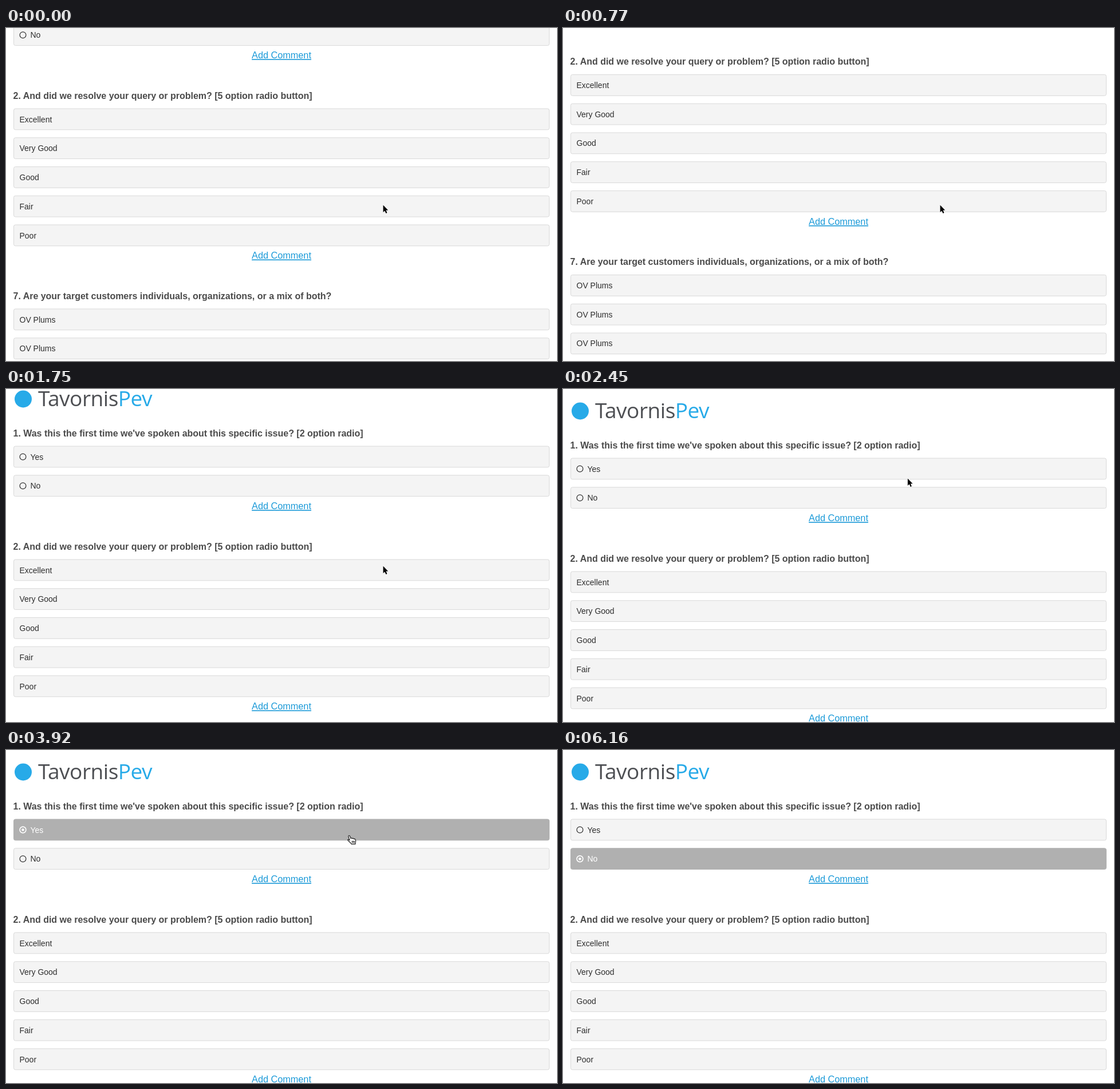
An HTML page for the animation above (6230 ms loop, 962x582 px).

```html
<!DOCTYPE html>
<html lang="en">
<head>
<meta charset="utf-8">
<title>Survey</title>
<style>
html, body { margin: 0; width: 100%; height: 100%; overflow: hidden; background: #fff; }
svg { display: block; width: 962px; height: 582px; font-family: "Liberation Sans", Arial, sans-serif; }
.heading { font-size: 15.97px; font-weight: bold; fill: #4b4b4b; }
.label { font-size: 14px; }
.link { font-size: 16.25px; fill: #1b9ad8; text-decoration: underline 1px; text-anchor: middle; }
.brand { font-family: "Open Sans", sans-serif; font-size: 37px; letter-spacing: -.5px; fill: #4d4f53; }
.brand tspan { fill: #27aae8; }
</style>
</head>
<body>
<svg viewBox="0 0 962 582">
  <g id="page">
    <circle cx="30" cy="38.5" r="15" fill="#27aae8"/>
    <text class="brand" x="56" y="51">Tavornis<tspan>Pev</tspan></text>
  </g>
  <path id="arrow" d="M.5 .5V13L3.3 10.4L5.4 15L7.4 14.1L5.5 9.6H9.2Z" stroke="#fff" paint-order="stroke"/>
  <path id="hand" fill="#fff" stroke="#111" stroke-width="1.1" stroke-linejoin="round"
    d="M4.2 9.6L1.9 2.8Q2.5 0 4.7 2.5L6.1 6.4Q7.5 4.4 8.9 6.8Q10.3 5 11.6 7.5Q14 6.2 14.6 10Q15.1 12.4 14.1 14.2V16.2H7.2Q6.4 14.4 3.2 11.8L.9 9.5Q.6 6.8 4.2 9.6ZM8.5 10.5V14M10.5 10.5V14M12.4 10.5V14"/>
</svg>
<script>
const LOOP = 6230, TICK = 70, ROW_STEP = 50.75;
const PICK_YES = 3290, PICK_NO = 4830, CURSOR_GONE = 5460;
const INK = 46, IDLE = 244, PICKED = 176, EDGE = 217;
const page = document.getElementById('page');
const arrow = document.getElementById('arrow');
const hand = document.getElementById('hand');

function add(tag, attrs, text) {
  const node = document.createElementNS(page.namespaceURI, tag);
  for (const key in attrs) node.setAttribute(key, attrs[key]);
  if (text) node.textContent = text;
  return page.appendChild(node);
}

function addRow(y, text, hasRadio) {
  const box = add('rect', { x: 13.5, y: y - 18.5, width: 935, height: 36.8, rx: 3, fill: gray(IDLE), stroke: gray(EDGE) });
  const ring = hasRadio && add('circle', { cx: 29.5, cy: y, r: 5.4, fill: 'none' });
  const dot = hasRadio && add('circle', { cx: 29.5, cy: y, r: 2.3, fill: '#fff' });
  const label = add('text', { class: 'label', x: hasRadio ? 42.5 : 23.5, y: y + 5, fill: gray(INK) }, text);
  return { box, ring, dot, label };
}

function addQuestion(y, title, options, hasRadio) {
  add('text', { class: 'heading', x: 12.5, y: y + 5.5 }, title);
  const rows = options.map((text, i) => addRow(y + 41.5 + i * ROW_STEP, text, hasRadio));
  add('text', { class: 'link', x: 481, y: y + 31.7 + options.length * ROW_STEP }, 'Add Comment');
  return rows;
}

const clamp = v => Math.max(0, Math.min(1, v));
const smooth = p => p * p * (3 - 2 * p);
const easeOut = p => 1 - (1 - p) ** 2;
const mix = (a, b, p) => a + (b - a) * p;
const gray = v => `rgb(${v},${v},${v})`;
const progress = (t, start, end, ease = smooth) => ease(clamp((t - start) / (end - start)));

const [yes, no] = addQuestion(98, "1. Was this the first time we've spoken about this specific issue? [2 option radio]", ['Yes', 'No'], true);
addQuestion(296, '2. And did we resolve your query or problem? [5 option radio button]',
  ['Excellent', 'Very Good', 'Good', 'Fair', 'Poor']);
addQuestion(646, '7. Are your target customers individuals, organizations, or a mix of both?',
  Array(6).fill('OV Plums'));

// One flick down, one flick up, then a decelerating return to the top.
function scrollAt(t) {
  return 178 + 120.7 * progress(t, 0, 560)
    - 214.7 * progress(t, 560, 1156)
    - 84 * progress(t, 1540, 1960, easeOut);
}

function cursorAt(t) {
  const toYes = progress(t, 2030, 2520);
  const toNo = progress(t, 3850, 4410);
  const leave = progress(t, 4970, 5390);
  return [658 - 60 * toYes - 3 * toNo + 252 * leave, 309 - 162 * toYes + 51.5 * toNo + 324.5 * leave];
}

function paintRow(row, t, start, end) {
  const picked = t >= start ? 1 - progress(t, end, end + 210) : 0;
  const checked = t > start && t <= end;
  const ink = gray(mix(INK, 255, picked * clamp(.25 + (t - start) / 380)));
  row.box.setAttribute('fill', gray(mix(IDLE, PICKED, picked)));
  row.box.setAttribute('stroke', gray(mix(EDGE, PICKED, picked)));
  row.label.setAttribute('fill', ink);
  row.ring.setAttribute('stroke', ink);
  row.ring.setAttribute('stroke-width', checked ? 1.6 : 1.2);
  show(row.dot, checked);
}

function show(node, visible) {
  node.style.display = visible ? '' : 'none';
}

function place(node, visible, x, y) {
  show(node, visible);
  node.setAttribute('transform', `translate(${x} ${y})`);
}

function render(time) {
  const t = Math.floor((time % LOOP) / TICK) * TICK;
  page.setAttribute('transform', `translate(0 ${-scrollAt(t)})`);
  paintRow(yes, t, PICK_YES, PICK_NO);
  paintRow(no, t, PICK_NO, LOOP);
  const [x, y] = cursorAt(t);
  const overRow = t >= 2940 && y < 209;
  place(arrow, !overRow && t < CURSOR_GONE, x, y);
  place(hand, overRow, x - 2, y - 1);
}

const start = performance.now();
function frame() {
  render(performance.now() - start);
  requestAnimationFrame(frame);
}
frame();
</script>
</body>
</html>
```
